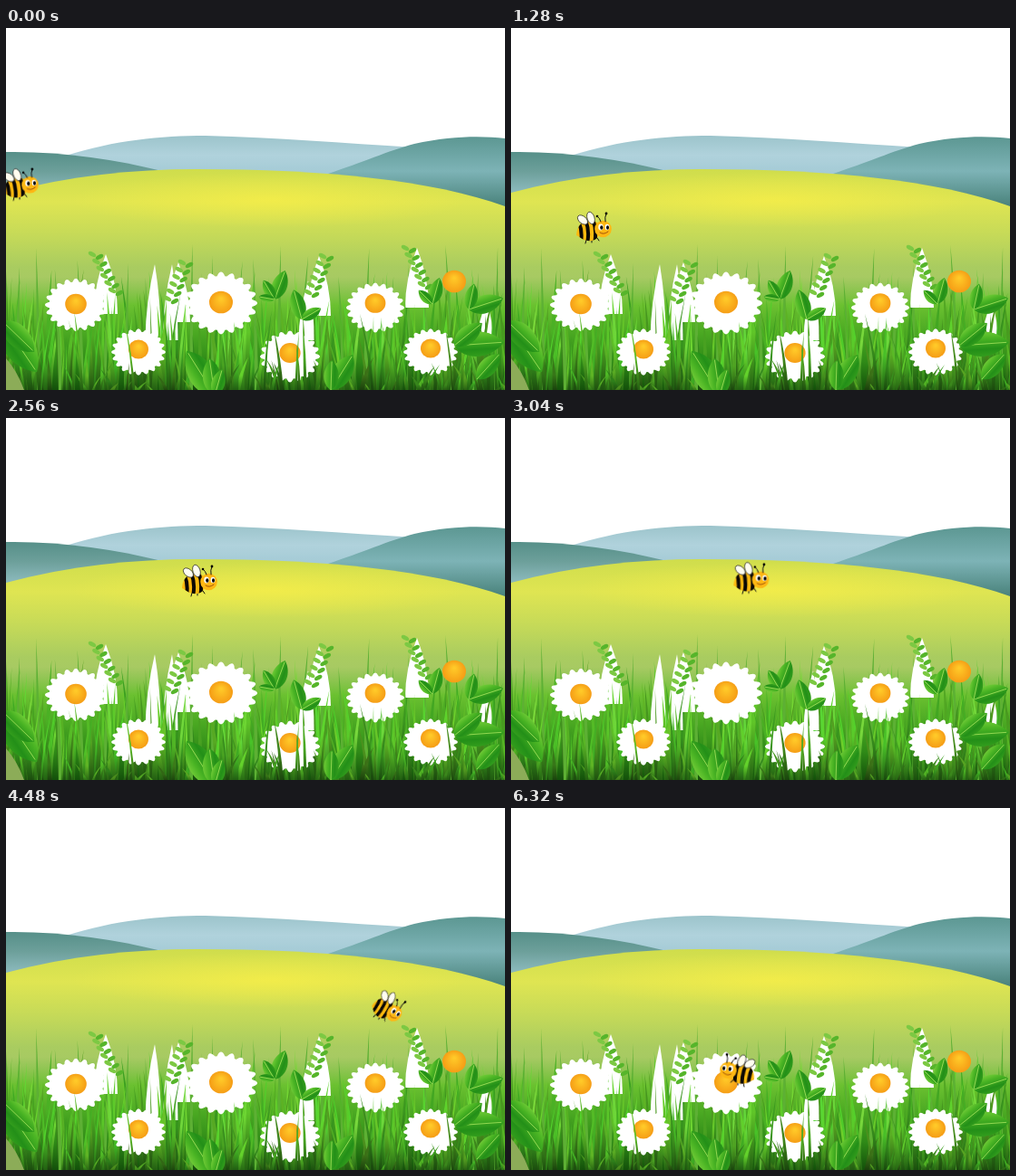
Write an HTML page with a canvas that moves like this. It is 550 px wide and 400 px high and loops after 6400 ms.

```html
<!DOCTYPE html>
<html lang="en">
<head>
<meta charset="utf-8">
<title>Bee over the meadow</title>
<style>
html, body { margin: 0; width: 100%; height: 100%; overflow: hidden; background: #fff; }
canvas, svg { position: absolute; left: 0; top: 0; width: 550px; height: 400px; }
#bee { animation: fly 6400ms -1ms infinite; }
/* every step lasts 80 ms */
@keyframes fly {
  0%     { transform: translate(16px, 173px) rotate(-4deg) scale(1, 1); animation-timing-function: steps(16); }
  20%    { transform: translate(91px, 221px) rotate(0deg) scale(1, 1); animation-timing-function: steps(16); }
  40%    { transform: translate(213px, 180px) rotate(0deg) scale(1, 1); animation-timing-function: steps(12); }
  55%    { transform: translate(316px, 175px) rotate(3deg) scale(1, 1); animation-timing-function: steps(12); }
  70%    { transform: translate(421px, 221px) rotate(34deg) scale(.86, 1); animation-timing-function: steps(7); }
  78.74% { transform: translate(440px, 235px) rotate(20deg) scale(1, 1); animation-timing-function: step-end; }
  78.75% { transform: translate(440px, 235px) rotate(0deg) scale(-1, 1); animation-timing-function: steps(7); }
  87.5%  { transform: translate(399px, 241px) rotate(4deg) scale(-1, 1); animation-timing-function: steps(9); }
  98.75%, 100% { transform: translate(250px, 290px) rotate(7deg) scale(-1, 1); }
}
</style>
</head>
<body>
<canvas id="scene" width="550" height="400"></canvas>
<svg viewBox="0 0 550 400">
  <defs>
    <clipPath id="body"><path d="M-19 8C-18-4-12-8-3-8C5-8 8-2 7 4C6 12 0 15-6 14C-11 14-15 10-19 8Z"/></clipPath>
  </defs>
  <g id="bee" stroke-linecap="round">
    <path d="M-8 13l-1 4M-2 13v3M4 11l2 3" stroke="#111" fill="none"/>
    <g clip-path="url(#body)">
      <rect x="-20" y="-10" width="30" height="28" fill="#fbb90f"/>
      <path d="M-16-6Q-12 4-14 16M-9-9Q-4 3-7 17M-1-10Q4 2 1 17" stroke="#0b0805" stroke-width="4" fill="none"/>
    </g>
    <g fill="#fffdf0" stroke="#222" stroke-width=".7">
      <ellipse cx="-12" cy="-9" rx="6.5" ry="4" transform="rotate(40 -12 -9)"/>
      <ellipse cx="-3" cy="-11" rx="7" ry="4" transform="rotate(72 -3 -11)"/>
    </g>
    <circle cx="10.5" cy="1" r="9.3" fill="#fdb713"/>
    <path d="M8-7Q7-11 4-13M13-7Q12-12 14-16" stroke="#111" fill="none"/>
    <circle cx="4" cy="-13" r="1.3"/><circle cx="14" cy="-16" r="1.4"/>
    <ellipse cx="8" cy="-1" rx="2.7" ry="3.4" fill="#fff"/>
    <ellipse cx="15" cy="-1" rx="2.4" ry="3.2" fill="#fff"/>
    <ellipse cx="8.8" cy="-.5" rx="1.6" ry="2.3"/><ellipse cx="15.5" cy="-.5" rx="1.5" ry="2.2"/>
    <path d="M7 5Q11 8 16 4" stroke="#a0510a" fill="none"/>
  </g>
</svg>
<script>
const c = document.getElementById('scene').getContext('2d');
const TAU = Math.PI * 2;

let seed = 41;
function rand(a, b) {
  seed = (seed * 16807) % 2147483647;
  return a + (b - a) * seed / 2147483647;
}

// evenly spaced vertical colour stops
function ramp(y0, y1, ...colors) {
  const g = c.createLinearGradient(0, y0, 0, y1);
  colors.forEach((color, i) => g.addColorStop(i / (colors.length - 1), color));
  return g;
}

function fill(path, color) {
  c.fillStyle = color;
  c.fill(new Path2D(path));
}

function dot(x, y, rx, ry, angle, color) {
  c.fillStyle = color;
  c.beginPath();
  c.ellipse(x, y, rx, ry, angle, 0, TAU);
  c.fill();
}

function blade(x, base, tipX, tipY, w, color) {
  const midX = x + (tipX - x) * 0.2, midY = (base + tipY) / 2;
  c.fillStyle = color;
  c.beginPath();
  c.moveTo(x - w / 2, base);
  c.quadraticCurveTo(midX - w / 2, midY, tipX, tipY);
  c.quadraticCurveTo(midX + w / 2, midY, x + w / 2, base);
  c.fill();
}

// blades of random green spread over the whole width
function grass(count, top, bottom, wMax, light) {
  for (let i = 0; i < count; i++) {
    const x = rand(-10, 560), tip = rand(top, bottom), tone = light + rand(-10, 10);
    const color = `hsl(${rand(95, 108)} 66% ${tone}%)`;
    blade(x, 404, x + rand(-16, 16), tip, rand(2, wMax), ramp(tip, 404, color, color, `hsl(108 70% ${tone * 0.45}%)`));
  }
}

function leaf(x, y, len, deg) {
  const wide = len * 0.33;
  c.save();
  c.translate(x, y);
  c.rotate(deg * Math.PI / 180);
  fill(`M0 0C${len * 0.2} ${-wide} ${len * 0.7} ${-wide} ${len} 0C${len * 0.7} ${wide} ${len * 0.2} ${wide} 0 0`,
    ramp(-wide, wide, '#83d640', '#4ab424', '#238f18', '#3ca51f'));
  c.strokeStyle = '#a4e35c';
  c.lineWidth = 0.8;
  c.beginPath();
  c.moveTo(0, 0);
  c.lineTo(len * 0.95, 0);
  c.stroke();
  c.restore();
}

// leaves fanned out from one foot, each shorter than the last
function fan(x, y, count, len, deg, turn) {
  for (let i = 0; i < count; i++) leaf(x, y, len * 0.72 ** i, deg + turn * i);
}

// white bud with a stem of small paired leaves in front
function sprig(x, y, lean) {
  blade(x, y + 66, x, y, 26, '#fff');
  for (let i = 0; i < 6; i++) {
    const px = x + lean * (i / 5 - 0.5), py = y + i * 8;
    dot(px - 4, py, 4.6, 2.4, 0.5, '#7cc943');
    dot(px + 4, py + 3, 4.6, 2.4, -0.5, '#56b52b');
  }
}

function heart(x, y, r) {
  const g = c.createRadialGradient(x, y - r * 0.3, 1, x, y, r);
  g.addColorStop(0, '#ffc928');
  g.addColorStop(1, '#f59c15');
  dot(x, y, r, r * 0.95, 0, g);
}

function daisy(x, y, rx, drop) {
  const ry = rx * 0.86, petals = 20;
  c.save();
  c.translate(x, y + drop);
  c.scale(rx, ry);
  dot(0, 0, 0.87, 0.87, 0, '#fff');
  for (let i = 0; i < petals; i++) {
    c.rotate(TAU / petals);
    dot(0.62, 0, 0.38, 0.14, 0, '#fff');
  }
  c.restore();
  heart(x, y, 5 + rx * 0.2);
}

function hills() {
  fill('M66 141C120 124 170 119 220 119C300 121 370 127 450 132V190H66Z', ramp(119, 162, '#9cc4cb', '#b0d2dc', '#a3cad5'));
  fill('M0 137C60 136 120 145 172 158V190H0Z', ramp(136, 180, '#558f88', '#6c9f9a', '#8ab8bb'));
  fill('M352 162C395 148 420 136 450 128C490 119 525 119 550 122V200H352Z', ramp(120, 196, '#5c9792', '#7db3b6', '#4a837c'));
  fill('M0 182C70 163 140 156 210 156C350 156 470 168 550 197V400H0Z',
    ramp(156, 300, '#cfdd4c', '#dfe552', '#c6da58', '#a9cc60', '#a4c568'));
  const glow = c.createRadialGradient(0, 0, 5, 0, 0, 220);
  glow.addColorStop(0, 'rgba(250,239,70,.65)');
  glow.addColorStop(1, 'rgba(250,239,70,0)');
  c.save();
  c.translate(290, 190);
  c.scale(1, 0.14);
  dot(0, 0, 220, 220, 0, glow);
  c.restore();
}

function meadow() {
  c.fillStyle = ramp(275, 400, 'rgba(118,195,62,0)', '#6bc130', '#4aa822', '#2f8a17', '#13500a');
  c.fillRect(0, 275, 550, 125);
  grass(130, 265, 320, 6, 44);
  for (let x = 12; x < 550; x += 24) blade(x, 400, x + rand(-10, 10), rand(238, 285), 4, '#5db034');

  for (const x of [162, 181, 331, 528]) blade(x, 345, x + 2, 260 + Math.abs(x - 170) * 0.12, 17, '#fff');
  sprig(110, 250, 22);
  sprig(190, 259, -16);
  sprig(345, 252, -16);
  sprig(453, 243, 18);
  grass(90, 290, 325, 6, 44);

  fan(296, 300, 3, 34, -70, -50);
  fan(326, 322, 2, 34, -105, 75);
  fan(470, 305, 2, 30, -75, -60);
  fan(510, 311, 2, 40, -18, -60);

  heart(494, 280, 13);
  daisy(77, 305, 34, 1);
  daisy(237, 303, 40, 1);
  daisy(407, 304, 32, 5);
  grass(95, 318, 372, 6, 40);

  daisy(146, 355, 30, 3);
  daisy(313, 359, 33, 4);
  daisy(468, 354, 30, 4);
  grass(75, 362, 394, 6, 33);
  grass(22, 305, 350, 4, 40);

  fill('M0 365Q13 380 20 400H0Z', '#8cac58');
  fan(-4, 324, 2, 68, 56, -12);
  fan(230, 406, 3, 58, -122, 24);
  fan(358, 400, 2, 46, -58, -30);
  fan(494, 351, 2, 55, -4, -35);
  fan(519, 388, 1, 38, -48, 0);
}

hills();
meadow();
</script>
</body>
</html>
```
